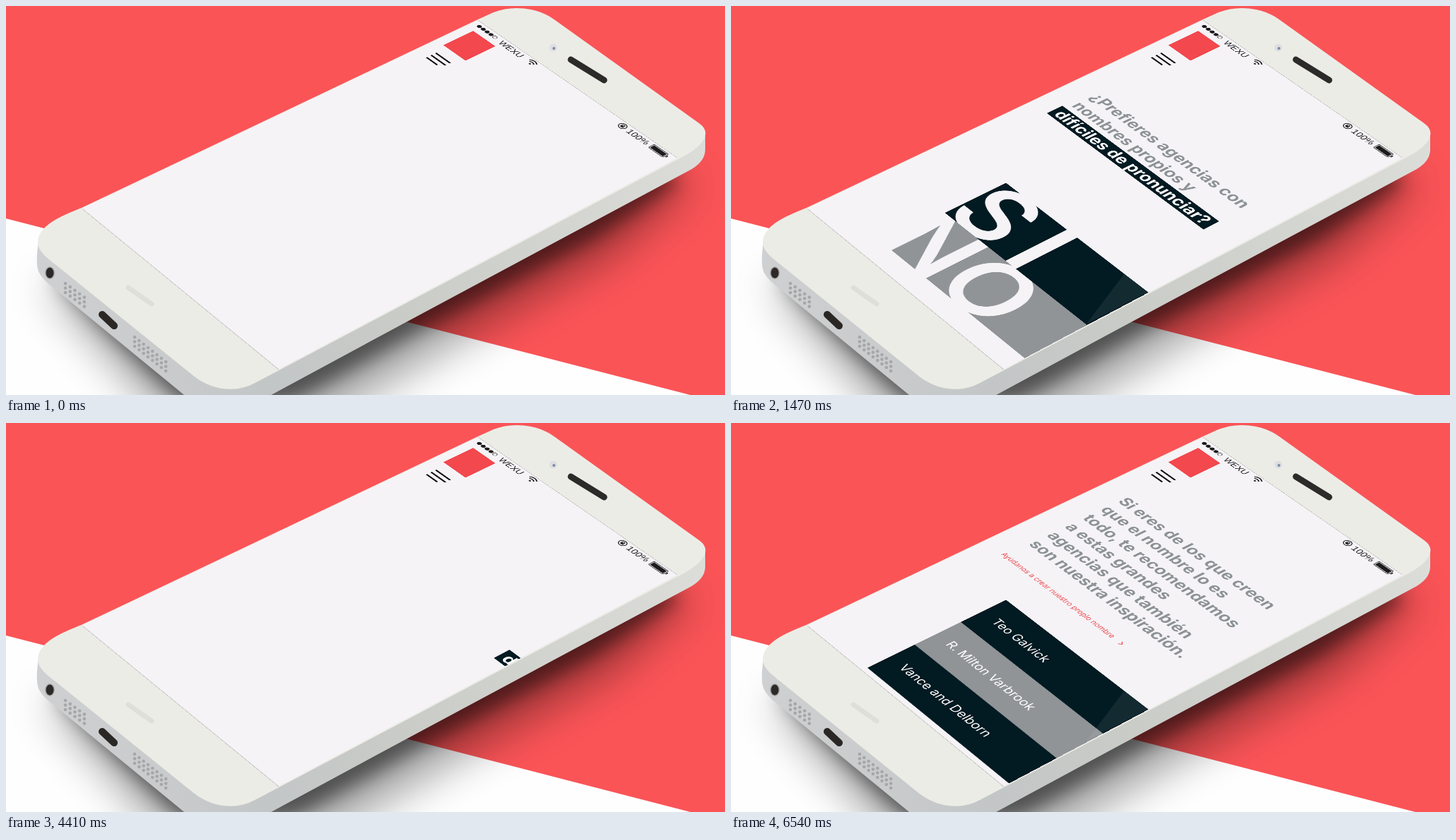
Animation of 1017x551 px, one loop 8000 ms. Source, as an HTML page:

```html
<!DOCTYPE html>
<html lang="es">
<head>
<meta charset="utf-8">
<title>Phone menu</title>
<style>
  html, body { margin: 0; width: 100%; height: 100%; overflow: hidden; background: #fa5457; }
  #stage { position: absolute; left: 0; top: 0; width: 1017px; height: 551px; overflow: hidden; }
  #stage > svg { position: absolute; left: 0; top: 0; }
  #screen { transform-origin: 0 0; overflow: hidden; }
  .title { font: 700 21px Inter, Roboto, sans-serif; fill: #8d9295; }
  .title .lit { fill: #fff; }
  .link { font: 400 9.4px Inter, Roboto, sans-serif; fill: #f0474d; }
  .item { font: 400 15.5px Inter, Roboto, sans-serif; fill: #fff; }
  .big { font: 600 118px Inter, Roboto, sans-serif; fill: #f5f3f6; }
  .status { font: 12px "Liberation Sans", Arial, sans-serif; fill: #1c1c1c; }
  .dark { fill: #021a22; }
  .grey { fill: #909497; }
</style>
</head>
<body>
<div id="stage">
  <svg width="1017" height="551" viewBox="0 0 1017 551">
    <defs>
      <filter id="soft" x="-20%" y="-30%" width="140%" height="160%"><feGaussianBlur stdDeviation="13"/></filter>
      <filter id="wide" x="-20%" y="-30%" width="140%" height="160%"><feGaussianBlur stdDeviation="30"/></filter>
      <linearGradient id="side" gradientUnits="userSpaceOnUse" x1="45" y1="380" x2="989" y2="200">
        <stop offset="0" stop-color="#cfd0d1"/><stop offset=".3" stop-color="#c3c6c7"/>
        <stop offset=".5" stop-color="#c9cbc7"/><stop offset="1" stop-color="#dcddd9"/>
      </linearGradient>
    </defs>
    <rect width="1017" height="551" fill="#fa5457"/>
    <path d="M0 301L968 551H0Z" fill="#fefefe"/>
    <path d="M50 390L220 580H460L640 475L860 352L975 250L900 230L400 440Z" opacity=".36" filter="url(#wide)"/>
    <path d="M62 385L250 562H405L600 452L830 330L955 248L900 220L400 440Z" opacity=".5" filter="url(#soft)"/>
    <path d="M46 332C44 350 42 364 46 376C51 387 62 395 72 403L252 551H375L560 451L970 231C985 222 989 212 989 203V178L500 300Z" fill="url(#side)"/>
    <path d="M107 287C85 296 45 310 46 336C47 348 60 357 70 365L262 520C290 544 325 548 352 533L958 212C985 198 998 180 980 167L775 20C750 2 715 0 690 10L668 20Z" fill="#ecece6" stroke="#ecece6" stroke-width="2"/>
    <g stroke-linecap="round" fill="none">
      <path d="M799 76L846 105" stroke="#2c2b2a" stroke-width="9"/>
      <path d="M173 399L206 422" stroke="#dedfd9" stroke-width="7"/>
      <path d="M136 437L153 453" stroke="#2b2725" stroke-width="10"/>
    </g>
    <circle cx="774" cy="59" r="5.5" fill="#dcdee1"/><circle cx="775" cy="60" r="2" fill="#7d8ba3"/>
    <ellipse cx="62" cy="378" rx="7" ry="9" fill="#a9aaaa"/><ellipse cx="62" cy="378" rx="5.5" ry="7.5" fill="#2c2928"/>
    <g id="grilles" fill="#a6a7a8"></g>
  </svg>

  <svg id="screen" width="640" height="1136" viewBox="0 0 320 568">
    <defs>
      <clipPath id="rowSi"><rect x="93" y="373" width="227" height="84"/></clipPath>
      <clipPath id="rowNo"><rect x="93" y="457" width="227" height="83"/></clipPath>
      <clipPath id="blockSiArea"><rect x="208.5" y="373" width="112" height="84"/></clipPath>
      <clipPath id="list"><rect x="93" y="373" width="227" height="190"/></clipPath>
      <clipPath id="copy"><rect x="32" y="130" width="288" height="180"/></clipPath>
      <clipPath id="linkArea"><rect x="28" y="312" width="292" height="22"/></clipPath>
    </defs>
    <rect width="320" height="568" fill="#f5f3f6"/>
    <path d="M0 .3H320M0 567.6H320" stroke="#8d8d8b" stroke-width=".6" opacity=".6"/>

    <g id="dots" fill="#1c1c1c"></g>
    <circle cx="36" cy="7.5" r="2.6" fill="none" stroke="#333" stroke-width=".7"/>
    <text class="status" x="46" y="12.5">WEXU</text>
    <g fill="none" stroke="#1c1c1c" stroke-width="1.5">
      <path d="M91 5.5Q97 .5 103 5.5M93.3 8Q97 5 100.7 8"/>
      <circle cx="243" cy="8" r="4.8" stroke-width="1"/>
      <path d="M241.4 8V6.5Q243 4 244.6 6.5V8" stroke-width=".9"/>
      <rect x="287.5" y="3.5" width="22" height="9" rx="1.5" stroke-width=".7"/>
    </g>
    <circle cx="97" cy="10.5" r="1.3" fill="#1c1c1c"/>
    <rect x="240.8" y="7.5" width="4.4" height="3" fill="#1c1c1c"/>
    <text class="status" x="252" y="12.5">100%</text>
    <path d="M288.7 4.7H308.3V11.3H288.7ZM310.5 6.3H312V9.7H310.5Z" fill="#1c1c1c"/>
    <rect x="12" y="19" width="37" height="46" fill="#f2484e"/>
    <path d="M18 82H42M18 89H42M18 96H36" stroke="#111" stroke-width="2.2"/>

    <g class="title" id="question"></g>

    <g clip-path="url(#rowNo)">
      <g id="tileNo"><rect class="grey" x="93" y="457" width="172" height="83"/><text class="big" x="83" y="541">NO</text></g>
      <g id="blockNo"><rect class="grey" x="264" y="457" width="56" height="83"/></g>
    </g>
    <g clip-path="url(#rowSi)">
      <g id="tileSi"><rect class="dark" x="93" y="373" width="99" height="84"/><text class="big" x="90" y="458">S</text></g>
      <g id="blockSi"><rect class="dark" x="208.5" y="373" width="111.5" height="84"/></g>
      <g clip-path="url(#blockSiArea)"><circle id="ripple" cx="258" cy="413" fill="#f5122f"/></g>
    </g>

    <g class="title" id="answer" clip-path="url(#copy)"></g>
    <g clip-path="url(#linkArea)">
      <g id="link">
        <text class="link" x="28.5" y="326.5">Ayúdanos a crear nuestro propio nombre</text>
        <path d="M221 321L224 324L221 327" fill="none" stroke="#f0474d" stroke-width="1.1"/>
      </g>
    </g>
    <g id="names" clip-path="url(#list)"></g>
  </svg>

  <svg width="1017" height="551" viewBox="0 0 1017 551">
    <path d="M558 377L591 405L503 450Z" fill="#fff" opacity=".07"/>
  </svg>
</div>

<script>
const LOOP = 8000;
const $ = id => document.getElementById(id);
const clamp = x => Math.min(1, Math.max(0, x));
const ease = x => x < .5 ? 4 * x ** 3 : 1 - 4 * (1 - x) ** 3;

// Projects the flat screen onto the phone face; corners run clockwise from the top left.
function project(el, w, h, [[x0, y0], [x1, y1], [x2, y2], [x3, y3]]) {
  const ax = x1 - x2, bx = x3 - x2, sx = x0 - x1 + x2 - x3;
  const ay = y1 - y2, by = y3 - y2, sy = y0 - y1 + y2 - y3;
  const det = ax * by - bx * ay;
  const g = (sx * by - bx * sy) / det, k = (ax * sy - sx * ay) / det;
  const m = [
    (x1 - x0 + g * x1) / w, (y1 - y0 + g * y1) / w, 0, g / w,
    (x3 - x0 + k * x3) / h, (y3 - y0 + k * y3) / h, 0, k / h,
    0, 0, 1, 0, x0, y0, 0, 1
  ];
  el.style.transform = `matrix3d(${m.map(n => n.toFixed(9))})`;
}
project($('screen'), 640, 1136, [[668, 20], [950, 215], [385, 515], [107, 287]]);

const grid = (cols, x, y, dx, dy) => Array.from({ length: cols * 3 }, (_, i) => {
  const c = i % cols, r = Math.floor(i / cols);
  return `<circle cx="${x + c * dx}" cy="${y + c * dy + r * 6.5}" r="2.3"/>`;
}).join('');
$('grilles').innerHTML = grid(5, 84, 393, 6.7, 4.9) + grid(8, 182, 469, 6.3, 5);
$('dots').innerHTML = [10, 16.5, 23, 29.5].map(x => `<circle cx="${x}" cy="7.5" r="2.9"/>`).join('');

const lines = (texts, x, y) => texts
  .map((s, i) => `<g><text x="${x}" y="${y + i * 26}">${s}</text></g>`).join('');

const highlighted = 'difíciles de pronunciar?';
$('question').innerHTML = lines(['¿Prefieres agencias con', 'nombres propios y', highlighted], 32, 202);
$('question').lastChild.innerHTML +=
  `<svg id="marker" x="26" y="235.5" height="22.5">
    <rect class="dark" width="253" height="22.5"/><text class="lit" x="6" y="18.5">${highlighted}</text></svg>`;

$('answer').innerHTML = lines(['Si eres de los que creen', 'que el nombre lo es', 'todo, te recomendamos',
  'a estas grandes', 'agencias que también', 'son nuestra inspiración.'], 33, 161);

$('names').innerHTML = ['Teo Galvick', 'R. Milton Varbrook', 'Vance and Delborn']
  .map((s, i) => `<g><rect class="${i === 1 ? 'grey' : 'dark'}" x="93" y="${373 + i * 62.4}" width="227" height="62.6"/>
    <text class="item" x="112" y="${410 + i * 62.4}">${s}</text></g>`).join('');

// Each mover: element, starting offset, then steps of [start, duration, offset].
const movers = [
  [$('blockSi'), -227, [700, 480, 0], [3680, 480, -227]],
  [$('tileSi'), -99, [770, 480, 0], [3600, 480, -99]],
  [$('blockNo'), -227, [1030, 440, 0], [3530, 480, -227]],
  [$('tileNo'), -172, [1030, 440, 0], [3400, 480, -172]],
  [$('link'), -197, [5610, 548, 0]]
];
[...$('question').children].forEach((el, i) =>
  movers.push([el, 290, [-40 + i * 100, 540, 0], [3920 + i * 70, 480, 300]]));
[...$('answer').children].forEach((el, i) =>
  movers.push([el, -247, [4665 + i * 150, 548, 0]]));
[...$('names').children].forEach((el, i) =>
  movers.push([el, -227, [5760 + i * 150, 480, 0]]));

function offset(t, from, steps) {
  let prev = from, pos = from;
  for (const [start, dur, to] of steps) {
    pos += (to - prev) * ease(clamp((t - start) / dur));
    prev = to;
  }
  return pos;
}

function draw(t) {
  for (const [el, from, ...steps] of movers)
    el.setAttribute('transform', `translate(${offset(t, from, steps).toFixed(2)} 0)`);
  $('marker').setAttribute('width', (253 * ease(clamp((t - 780) / 400))).toFixed(2));
  const p = clamp((t - 2970) / 630);
  $('ripple').setAttribute('r', t < 2970 ? 0 : 3.5 + 90 * p);
  $('ripple').setAttribute('opacity', 1 - p);
}

const begin = performance.now();
function tick() {
  draw((performance.now() - begin) % LOOP);
  requestAnimationFrame(tick);
}
tick();
</script>
</body>
</html>
```
